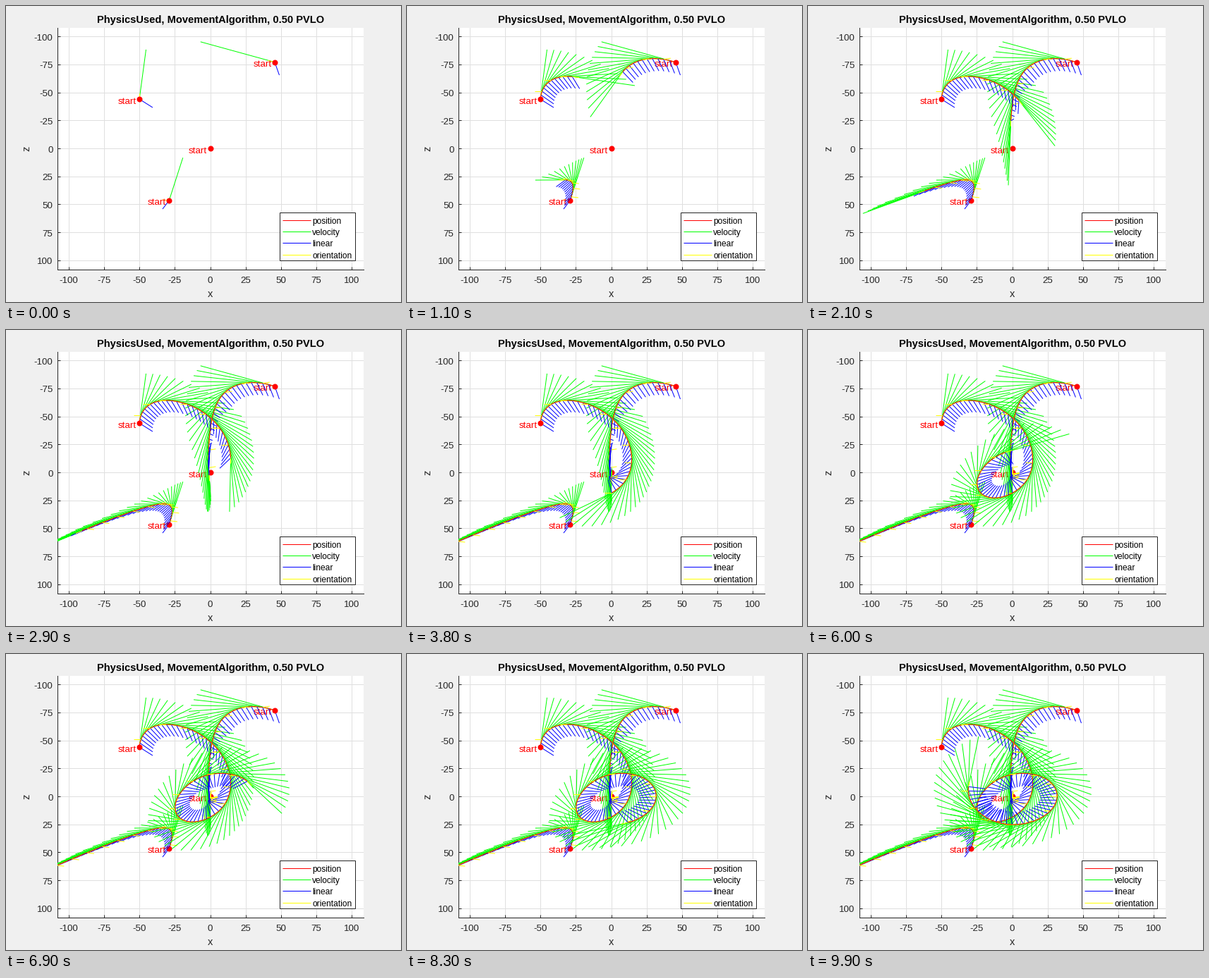
A matplotlib script that plays this animation: 560 by 420 pixels, repeating every 10 s.

```python
import matplotlib.pyplot as plt
import numpy as np
from matplotlib.animation import FuncAnimation
from matplotlib.collections import LineCollection
from matplotlib.patches import Rectangle

W, H = 560, 420
STEPS, DT, SCALE, LIMIT = 100, 0.5, 6, 108
LEFT, TOP, WIDTH, HEIGHT = 72.55, 30.5, 434, 343
INK = "#262626"
RED, GREEN, BLUE, YELLOW = "#ff0000", "#00ff00", "#0000ff", "#ffff00"

plt.rcParams["font.family"] = "Liberation Sans"


def px(n):
    """Pixels to points at 100 dpi."""
    return n * 0.72


def unit(v):
    size = np.hypot(*v)
    return v / size if size > 1e-12 else v * 0


def clip(v, top):
    return unit(v) * top if np.hypot(*v) > top else v


# Steering behaviours, all relative to the origin; z grows downwards.
def stay(p, v):
    return np.zeros(2)


def flee(p, v):
    return unit(p) * 1.5


def seek(p, v):
    return -unit(p) * 2


def arrive(p, v):
    dist = np.hypot(*p)
    speed = 0 if dist < 4 else 10 * min(1, dist / 32)
    return clip((-unit(p) * speed - v) / 2, 2)


# position, velocity, steering, top speed, first facing, side facing, period, phase
AGENTS = [
    ((0, 0), (0, 0), stay, 1, (0, 0), (0, 0), 1, 0),
    ((-30, 50), (2, -7), flee, 8, (-1, -0.1), (1, 0.15), 3, 2),
    ((-50, -40), (0, -8), seek, 8, (0, -1), (-1, 0), 4, 3),
    ((50, -75), (-9, -4), arrive, 10, (-1, -0.3), (1, -0.2), 4, 3),
]


def simulate(pos, vel, steer, top, first, side, period, phase):
    p, v = np.array(pos, float), np.array(vel, float)
    steps = []
    for k in range(1, STEPS + 1):
        a = steer(p, v)
        prev, p = p, p + v * DT
        v = clip(v + a * DT, top)
        if k == 1:
            prev, face = p, np.array(first)
        elif k % period == phase:
            face = np.array(side)
        else:
            face = unit(v)
        ends = [v * SCALE, a * SCALE, face * 5]
        steps.append([(prev, p)] + [(p, p + e) for e in ends])
    return steps


runs = [simulate(*agent) for agent in AGENTS]
segments = [seg for step in zip(*runs) for lines in step for seg in lines]
PER_STEP = 4 * len(AGENTS)
COLORS = [RED, GREEN, BLUE, YELLOW] * len(AGENTS)

fig = plt.figure(figsize=(W / 100, H / 100), dpi=100, facecolor="#f0f0f0")
ax = fig.add_axes([LEFT / W, 1 - (TOP + HEIGHT) / H, WIDTH / W, HEIGHT / H])
ax.set_xlim(-LIMIT, LIMIT)
ax.set_ylim(LIMIT, -LIMIT)
ax.set_axisbelow(True)
ax.grid(color="#dfdfdf", lw=px(1))
ticks = np.arange(-100, 101, 25)
ax.set_xticks(ticks)
ax.set_yticks(ticks)
ax.tick_params(direction="in", length=px(4), width=px(1), color=INK,
               labelbottom=False, labelleft=False)
for side in ("top", "right"):
    ax.spines[side].set_visible(False)
for side in ("left", "bottom"):
    ax.spines[side].set(color=INK, linewidth=px(1))


def label(x, y, s, size, **kw):
    kw.setdefault("color", INK)
    fig.text(x / W, 1 - y / H, s, fontsize=px(size), va="baseline", **kw)


for t in ticks:
    label(289.3 + t * 2.005, 393, str(t), 13.33, ha="center")
    label(66.5, 207.5 + t * 1.588, str(t), 13.33, ha="right")
label(290, 24, "PhysicsUsed, MovementAlgorithm, 0.50 PVLO", 14.67,
      ha="center", weight="bold", color="black")
label(290, 413, "x", 14.67, ha="center")
fig.text(29.5 / W, 1 - 202.5 / H, "z", fontsize=px(14.67), color=INK,
         rotation=90, ha="center", va="center")


def trails(z):
    lines = LineCollection([], linewidths=px(1), zorder=z, capstyle="butt")
    return ax.add_collection(lines, autolim=False)


opening, later = trails(2), trails(4)
opening.set_segments(segments[:PER_STEP])
opening.set_color(COLORS)

for run in runs:
    x, z = run[0][0][1]
    ax.plot(x, z, "o", color=RED, ms=px(8), mew=0, zorder=3)
    ax.annotate("start", (x, z), (px(-4.3), px(-6.6)), color=RED,
                textcoords="offset points", ha="right", va="baseline",
                fontsize=px(13.33), zorder=3)

# Legend, laid out in pixels over the whole figure.
key = fig.add_axes([0, 0, 1, 1], zorder=5)
key.set(xlim=(0, W), ylim=(H, 0))
key.axis("off")
key.add_patch(Rectangle((388, 293.3), 107, 68, fc="white", ec=INK, lw=px(1)))
KEYS = [("position", RED), ("velocity", GREEN),
        ("linear", BLUE), ("orientation", YELLOW)]
for i, (name, color) in enumerate(KEYS):
    y = 304 + i * 16.2
    key.plot([392, 432], [y, y], color=color, lw=px(1), solid_capstyle="butt")
    key.text(434.3, y + 5, name, fontsize=px(12), color="black", va="baseline")


def update(i):
    later.set_segments(segments[PER_STEP:PER_STEP * (i + 1)])
    later.set_color(COLORS * i)
    return [later]


anim = FuncAnimation(fig, update, frames=STEPS, interval=100,
                     repeat=True, repeat_delay=0, blit=False)
plt.show()
```
